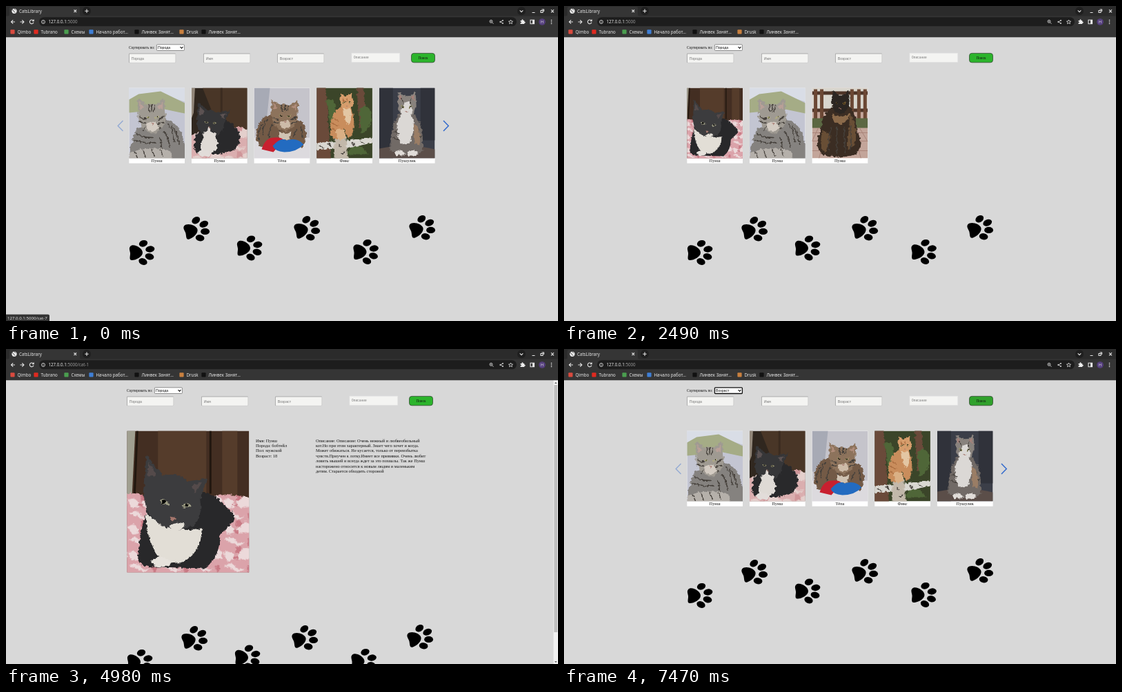
Write an HTML page that moves like this. It is 800 px wide and 456 px high and loops after 8 s.

```html
<!DOCTYPE html>
<html lang="ru">
<head>
<meta charset="utf-8">
<title>CatsLibrary</title>
<style>
  html, body { margin: 0; width: 100%; height: 100%; overflow: hidden; background: #d8d8d8; }
  svg { display: block; }
  #stage { width: 100vw; height: 100vh; }
  text { font: 6.2px 'Noto Sans', sans-serif; fill: #e8e8e8; white-space: pre; }
  .serif { font: 6.35px 'Liberation Serif', serif; fill: #111; }
  .sans { font: 5.2px 'Liberation Sans', sans-serif; fill: #111; }
  .mono { font: 4.5px 'Liberation Mono', monospace; }
  .hint { fill: #777; }
  .dim { fill: #999; }
  .mid { text-anchor: middle; }
  .line { fill: none; stroke: #e4e4e4; stroke-width: 1.1; }
  .fur { fill: none; stroke: #45403b; stroke-width: 1.5; stroke-linecap: round; }
  .soft { filter: url(#ruffle); }
</style>
</head>
<body>
<svg id="stage" viewBox="0 0 800 456" preserveAspectRatio="none">
  <defs>
    <filter id="ruffle" x="-5%" y="-5%" width="110%" height="110%" color-interpolation-filters="sRGB">
      <feTurbulence type="fractalNoise" baseFrequency=".22" numOctaves="2" seed="4"/>
      <feDisplacementMap in="SourceGraphic" scale="6" xChannelSelector="R" yChannelSelector="G"/>
      <feGaussianBlur stdDeviation=".45"/>
    </filter>
    <g id="paw">
      <path d="M2 9C7 5 19.500 12 19.500 18.500C19.500 24.500 10 29.500 4 29.500C-1 29.500 2 23 1.500 19C1 15-1 12 2 9Z"/>
      <ellipse rx="6.300" ry="4.700" transform="translate(20.500 5.300)rotate(-18)"/>
      <ellipse rx="6.600" ry="4.600" transform="translate(30.300 13.500)rotate(-8)"/>
      <ellipse rx="6.500" ry="4.600" transform="translate(29.500 24.300)rotate(14)"/>
      <ellipse rx="6.400" ry="4.600" transform="translate(20 31.500)rotate(24)"/>
    </g>
    <g id="face">
      <path d="M-9.500-.500Q-6.500-3-3.500 1.300-7.500 2.500-9.500-.500ZM9.500-.500Q6.500-3 3.500 1.300 7.500 2.500 9.500-.500Z" fill="currentColor"/>
      <circle cx="-6.500" r="1.100"/><circle cx="6.500" r="1.100"/>
      <path d="M-2 8h4L0 10.500Z" fill="#a5766c"/>
    </g>
    <pattern id="blanket" width="46" height="38" patternUnits="userSpaceOnUse">
      <path fill="#dba3aa" d="M0 0h46v38H0z"/>
      <path fill="#ecd9da" d="M3 6Q12-2 19 6T34 8Q27 17 18 12T3 6ZM26 22Q36 14 45 23T33 34 26 22ZM1 25Q10 18 16 27T7 36Z"/>
      <path fill="#c97a85" d="M20 17Q26 12 28 19T20 25ZM37 4Q44 3 42 12T36 9ZM15 31Q22 27 24 35Z"/>
    </pattern>

    <symbol id="tabby" viewBox="0 0 81 102" preserveAspectRatio="none">
      <path fill="#c3c5d2" d="M0 0h81v102H0z"/>
      <path fill="#d9dde6" d="M0 0h81v20L42 8 0 24z"/>
      <path fill="#a5ac86" d="M0 17L14 9 46 5 81 22V37L52 31 0 36z"/>
      <g class="soft">
        <path fill="#85827f" d="M12 58Q3 74 0 104H83V86Q75 48 52 45z"/>
        <path fill="#9f9a92" d="M13 42L13 15 26 25Q34 22 40 24L51 16 54 42Q51 62 35 67 19 63 13 42z"/>
        <path fill="#b9a098" d="M15 32V20l8 8zM49 32V21l-8 6z"/>
        <path class="fur" d="M28 25l2 9M33 24v10M38 25l-2 9M15 42l9 4M14 49l10 2M51 41l-8 5M50 50l-10 2M20 60l6-4M46 60l-5-4M56 52q9 10 10 25M62 55q9 12 11 28M51 63q7 9 8 23M10 67q10 5 25 5M7 75q14 6 30 4M44 72q4 8 3 16"/>
        <ellipse cx="34" cy="56" rx="9" ry="7" fill="#d3cbc2"/>
        <use href="#face" transform="translate(34 43)" color="#b9b577"/>
        <path fill="#b5b0aa" d="M0 94Q28 84 56 90 66 96 60 104H0z"/>
        <path class="fur" d="M8 92l4 9M20 90l4 10M33 89l4 10M46 90l3 8"/>
      </g>
    </symbol>

    <symbol id="tuxedo" viewBox="0 0 81 102" preserveAspectRatio="none">
      <path fill="#30271f" d="M0 0h81v102H0z"/>
      <path fill="#493627" d="M16 0h65v60H40z"/>
      <path fill="#92877a" d="M0 0h5l-2 36-3 8z"/>
      <path fill="#3b2b20" d="M42 0h3v45h-3z"/>
      <g class="soft">
        <path fill="#d9bfb7" d="M-3 70Q20 58 45 60 68 51 84 63v42H-3z"/>
        <path fill="url(#blanket)" opacity=".6" d="M-3 70Q20 58 45 60 68 51 84 63v42H-3z"/>
        <path fill="#29292b" d="M7 67Q0 86 8 95 40 100 62 90 76 76 65 58 55 46 42 46z"/>
        <path fill="#363638" d="M8 53L9 21 24 33Q32 31 37 36L56 33 47 53Q47 66 31 72 10 70 8 53z"/>
        <path fill="#5c5252" d="M12 40V28l7 7zM42 39l9-3-5 9z"/>
        <path fill="#dfdad5" d="M25 57l4 7q10 3 5 8 7 8 2 18-12 9-21 2-5-8 3-19-5-7 4-11z"/>
        <use href="#face" transform="translate(27 50)rotate(6)scale(.9)" color="#aaa67c"/>
        <path fill="#e2dcd9" d="M8 93q10-7 21 0 2 7-10 6-10 0-11-6z"/>
      </g>
    </symbol>

    <symbol id="rest" viewBox="0 0 81 102" preserveAspectRatio="none">
      <path fill="#c5c4cb" d="M0 0h81v102H0z"/>
      <path fill="#a7aab5" d="M0 0h23l-6 59H0z"/>
      <path fill="#dcdade" d="M0 72h81v30H0z"/>
      <g class="soft">
        <path fill="#735a46" d="M33 37Q5 39 3 67 0 84 19 88L70 86Q81 69 70 48z"/>
        <path fill="#8d735c" d="M25 40L25 17 38 25Q45 22 52 25L64 18 63 41Q61 58 45 63 28 59 25 40z"/>
        <path fill="#b08c7a" d="M28 31v-9l6 6zM61 31v-8l-7 5z"/>
        <path class="fur" d="M40 25l1 9M45 24v10M50 25l-1 9M27 43l9 3M29 50l7 1M62 43l-9 3M61 50l-8 1M20 45q-9 9-7 23M27 53q-7 9-5 20M12 53q-7 9-5 22M36 61l5 9M61 61l-4 10M68 58l2 14"/>
        <ellipse cx="45" cy="53" rx="8" ry="6" fill="#cdbba8"/>
        <use href="#face" transform="translate(45 41)scale(.9)" color="#aca76e"/>
        <path fill="#cfc2b2" d="M36 63q9 5 18 0l-2 13H38z"/>
      </g>
      <path fill="#c8202f" d="M11 89Q16 72 29 72 40 71 43 76L28 93z"/>
      <path fill="#236bc0" d="M27 84Q39 71 47 76 63 71 72 82 62 93 44 93 30 92 27 84z"/>
    </symbol>

    <symbol id="ginger" viewBox="0 0 81 102" preserveAspectRatio="none">
      <path fill="#3b4529" d="M0 0h81v102H0z"/>
      <g class="soft">
        <path fill="#6a4a3a" d="M-4-4h17l8 110H-4zM58-4h10l5 61H62z"/>
        <path fill="#4f6638" d="M14 19q10-8 13 8T20 55zM62 30q15-9 17 9T65 67zM48 87q15-9 28 9H43z"/>
        <path fill="#d9d7d1" d="M-4 80l38-3 50-5v7l-38 8-50 3z"/>
        <path fill="#c2b8aa" d="M27 66q8-4 15 2l4 38H25z"/>
        <path class="fur" d="M5 83l4 4M17 80l3 5M52 79l3 4M64 77l4 3M32 83l5 2M36 95l6-2"/>
        <path fill="#c98d5c" d="M34 27Q18 41 20 66 24 76 32 73L39 58 46 73 51 70Q58 49 50 26z"/>
        <path fill="#d69d6c" d="M34 22L35 8 42 12 51 8 54 22Q51 32 43 33 36 31 34 22z"/>
        <path fill="#e3c6a3" d="M39 29q7 2 10 0 4 13-2 26-8-9-8-26z"/>
        <path d="M24 44l9 5M22 51l10 4M21 59l9 3M38 15l2 5M44 14v6" stroke="#ac6f42" stroke-width="1.500"/>
        <use href="#face" transform="translate(44 21)scale(.62)" color="#a99f62"/>
        <path fill="#dab085" d="M28 61q8-5 13 3 3 9-4 12-10-1-9-15z"/>
      </g>
    </symbol>

    <symbol id="calico" viewBox="0 0 81 102" preserveAspectRatio="none">
      <path fill="#3b3e48" d="M0 0h81v102H0z"/>
      <path fill="#30323a" d="M0 0h20v102H0zM60 0h21v76H60z"/>
      <path fill="#5b4e49" d="M0 88q40-9 81 1v13H0z"/>
      <g class="soft">
        <path fill="#716a66" d="M29 37Q14 58 17 92 40 102 63 93 66 54 51 38z"/>
        <path fill="#88827d" d="M27 26L28 5 35 12Q40 9 45 12L53 6 54 27Q51 41 40 44 29 40 27 26z"/>
        <path fill="#a5817a" d="M30 18l-1-8 6 5zM51 18l1-8-6 4z"/>
        <path fill="#dbd8d5" d="M38 20h5l5 13q-3 6 2 13 2 16-6 34l-12 2q-10-18-4-36 5-7 3-13z"/>
        <path class="fur" d="M33 15l2 7M47 15l-2 7M21 63l7 4M20 72l8 3M58 60l-5 6M61 70l-6 4"/>
        <path fill="#9a7d65" d="M50 50q12 12 9 32-8 1-8-10z"/>
        <use href="#face" transform="translate(40 27)scale(.85)" color="#a5a06e"/>
        <path fill="#e0dcd8" d="M23 94q6-8 15 0l-1 4H25zM41 93q8-6 15 1l-2 4H42z"/>
      </g>
    </symbol>

    <symbol id="fluffy" viewBox="0 0 81 102" preserveAspectRatio="none">
      <path fill="#c3a59a" d="M0 0h81v102H0z"/>
      <path fill="#d8d5cd" d="M0 0h81v35H0z"/>
      <path fill="#4f3528" d="M0 5h81v5H0zM0 30h81v5H0z"/>
      <path d="M5 2v47M14 2v47M58 2v47M68 2v47M77 2v47" stroke="#6b4734" stroke-width="5"/>
      <path fill="#5b6742" d="M0 44h81v14H0z"/>
      <path d="M0 65h81M0 77h81M0 91h81M9 58L0 77M69 58l12 20M17 77l-7 25M64 77l7 25" stroke="#a98479"/>
      <g class="soft">
        <path fill="#3b2d23" d="M30 26Q14 38 12 64 2 84 14 96 40 104 64 96 76 81 65 62 65 35 52 25z"/>
        <path fill="#684e35" d="M16 61q-8 23 3 33l9-24zM55 38q13 20 7 44l-11 8z"/>
        <path fill="#2c2622" d="M29 24L30 3 38 10h8L54 4 54 24Q52 36 41 38 31 35 29 24z"/>
        <path fill="#8b6a4a" d="M29 37q13 9 25 0 2 10-13 16-14-4-12-16z"/>
        <path class="fur" d="M28 58q-6 16-3 33M36 58v37M46 58l2 36M55 55q4 18 0 34"/>
        <use href="#face" transform="translate(41 22)scale(.8)" color="#b0873f"/>
      </g>
    </symbol>

    <symbol id="portrait" viewBox="0 0 177 205" preserveAspectRatio="xMidYMid slice">
      <path fill="#432e22" d="M0 0h177v205H0z"/>
      <path fill="#a09f90" d="M0 0h12L7 100H0z"/>
      <path d="M15 0L11 92M121 0v91" stroke="#21170f" stroke-width="3"/>
      <path fill="#553c2b" d="M45 0h70v90H45zM138 0h22v96h-22z"/>
      <g class="soft">
        <path fill="url(#blanket)" d="M-5 91Q24 87 35 103L115 97Q144 88 182 98v112H-5z"/>
        <path fill="#28282a" d="M30 111Q17 150 16 185 17 198 42 197L113 199Q135 183 135 150L155 131Q159 119 147 114 127 87 104 88z"/>
        <path fill="#e2ded6" d="M27 118Q60 150 108 142 110 168 84 189 62 196 46 182 28 158 27 118z"/>
        <path fill="#3c3c3e" d="M25 83L28 34 52 65Q75 59 88 73L116 69 106 100Q111 127 94 138 62 151 36 126 22 105 25 83z"/>
        <path fill="#544a4a" d="M30 66l1-21 12 20zM93 80l16-6-10 16z"/>
        <path fill="#e2ded6" d="M62 138q8-9 20-4 4 7-8 10-9 2-12-6z"/>
        <use href="#face" transform="translate(70 105)rotate(9)scale(2.500)" color="#a3a288"/>
        <path fill="#e6e2dc" d="M35 188q13-10 28 0 2 9-13 9-15 0-15-9z"/>
      </g>
    </symbol>
  </defs>

  <rect width="800" height="456" fill="#d8d8d8"/>
  <g id="page"></g>

  <path fill="#2b2b2b" d="M0 0h800v15H0z"/>
  <path fill="#353535" d="M0 14.500h3q2 0 2-2V3q0-2 2-2h98q2 0 2 2v9.500q0 2 2 2H800v30.800H0z"/>
  <circle cx="12" cy="7.300" r="3.600" fill="#eee"/>
  <path d="M9 5.500l2 1 .5 2 2 .7M12 4l2 2" fill="none" stroke="#555" stroke-width=".9"/>
  <text x="19" y="9.600">CatsLibrary</text>
  <circle cx="117" cy="7.300" r="6" fill="#1f1f1f"/><circle cx="747" cy="7.300" r="6" fill="#1f1f1f"/>
  <path class="line" d="M98.500 5.500l3.600 3.600m0-3.600l-3.600 3.600M114.300 7.300h5.400M117 4.600V10M744.700 6.300l2.300 2.300 2.300-2.300M762.500 9.500h4M775 6.500h3v3h-3zM776.500 5h3v3M790 5.300l4 4m0-4l-4 4"/>
  <rect x="48" y="16.300" width="692" height="13" rx="6.500" fill="#1d1d1d"/>
  <path class="line" d="M13 23H7.500m2.700-2.700L7.500 23l2.700 2.700M20.500 23H26m-2.700-2.700L26 23l-2.700 2.700M39.700 21.300a2.900 2.900 0 1 0 .3 2.500M40.200 19.500v2.300h-2.300"/>
  <g class="line" style="stroke-width:.8">
    <circle cx="54" cy="23" r="2.500"/><path d="M54 22.700v1.700M54 21.300v.7"/>
    <circle cx="703" cy="22.300" r="2"/><path d="M704.500 23.800l2 2M702 22.300h2"/>
    <path d="M719.800 21l-3.300 2 3.300 2"/><circle cx="720" cy="21" r=".7"/><circle cx="716.300" cy="23" r=".7"/><circle cx="720" cy="25" r=".7"/>
    <path d="M731.500 20l.9 2 2.200.2-1.700 1.400.5 2.200-1.900-1.200-1.900 1.200.5-2.200-1.700-1.400 2.200-.2z"/>
  </g>
  <path fill="#eee" d="M745.500 21h2q-.5-1.700 1-1.700t1 1.700h1.700v1.800q1.500-.3 1.500 1t-1.500 1V26h-5.700v-1.700q1.500 0 1.500-.9t-1.500-.9z"/>
  <path class="line" d="M760 20.300h5.500v5.400H760z"/><path fill="#eee" d="M763 20h3v6h-3z"/>
  <circle cx="777" cy="23" r="4.800" fill="#56407f"/><text x="777" y="25" class="mid" style="font-size:5.500px">H</text>
  <g fill="#eee"><circle cx="790.500" cy="20.500" r=".8"/><circle cx="790.500" cy="23" r=".8"/><circle cx="790.500" cy="25.500" r=".8"/></g>
  <g id="bookmarks"></g>
  <text x="61.500" y="25.200">127.0.0.1<tspan class="dim" id="path"></tspan></text>
  <g id="status"><path id="statusBox" fill="#333"/><text x="2" y="453.500" id="statusText" style="font-size:6.100px"></text></g>
</svg>
<script>
const $ = id => document.getElementById(id);
const text = (x, y, s, cls = '', extra = '') => `<text x="${x}" y="${y}" class="${cls}" ${extra}>${s}</text>`;
const photo = (id, x, y, w, h) => `<use href="#${id}" x="${x}" y="${y}" width="${w}" height="${h}"/>`;

const bookmarks = [
  [6, 'Qimbo', '#d94a3f'], [40, 'Tubrano', '#e02a20'], [84, 'Схемы', '#4a9e4f'],
  [120, 'Начало работ…', '#3f7fd6'], [186, 'Линвек Занят…', '#111'],
  [251, 'Drusk', '#c9803f'], [283, 'Линвек Занят…', '#111']
];
$('bookmarks').innerHTML = bookmarks.map(([x, name, color]) =>
  `<rect x="${x + .4}" y="34.200" width="6.200" height="6.200" rx="1" fill="${color}"/>` + text(x + 10.500, 39.500, name)).join('');

const home = [['tabby', 'Пунш'], ['tuxedo', 'Пунш'], ['rest', 'Тёпа'], ['ginger', 'Фикс'], ['calico', 'Пушулик']];
const found = [['portrait', 'Пунш'], ['tabby', 'Пунш'], ['fluffy', 'Пунш']];
const facts = ['Имя: Пунш', 'Порода: бобтейл', 'Пол: мужской', 'Возраст: 18'];
const about = [
  'Описание: Описание: Очень нежный и любвеобильный',
  'кот.Но при этом характерный. Знает чего хочет и когда.',
  'Может обижаться. Не кусается, только от переизбытка',
  'чувств.Приучен к лотку.Имеет все прививки. Очень любит',
  'ловить мышей и всегда ждет за это похвалы. Так же Пунш',
  'насторожено относится к новым людям и маленьким',
  'детям. Старается обходить стороной'
];
const pawSpots = [[178.500, 338.500], [258, 305], [334.500, 332], [418, 304], [503, 337.500], [585, 303]];

function field(x, hint, value) {
  const border = value ? 'stroke="#111" stroke-width="1.500"' : 'stroke="#c2c2c2" stroke-width=".6"';
  return `<rect x="${x + .4}" y="68.800" width="67.400" height="13.500" rx="1.500" fill="#f4f4f2" ${border}/>` +
    (value ? text(x + 3.500, 77.500, value, 'sans') + `<path d="M${x + 17.500} 73v5.500" stroke="#111" stroke-width=".5"/>`
           : `<path d="M${x + .5} 82V69h67" fill="none" stroke="#999" stroke-width=".6"/>` + text(x + 3.700, 77.500, hint, 'sans hint'));
}

function form({ name, sort, green = '#30a12c' }) {
  return text(178, 62.200, 'Сортировать по:', 'serif', 'style="font-size:5.400px"') +
    `<rect x="218.400" y="55.800" width="40" height="8.700" rx="1" fill="#fff" stroke="${sort ? '#111' : '#666'}" stroke-width="${sort ? 1.3 : .7}"/>` +
    text(220, 62, sort || 'Порода', 'sans') +
    '<path d="M252.500 59.200l2 2 2-2" fill="none" stroke="#111" stroke-width="1.100"/>' +
    field(178, 'Порода') + field(286, 'Имя', name) + field(393, 'Возраст') +
    '<rect x="501" y="68.200" width="69.500" height="13" fill="#f4f4f2" stroke="#e6e6e6" stroke-width=".6"/>' +
    text(504, 75.800, 'Описание', 'mono hint') +
    `<rect x="587.500" y="68.400" width="34" height="13.400" rx="3.500" fill="${green}" stroke="#2a3a2a" stroke-width=".7"/>` +
    text(604.500, 76.800, 'Поиск', 'serif mid', 'style="font-size:5.200px"');
}

const cards = list => list.map(([id, name], i) => {
  const x = 178.300 + i * 90.650;
  return `<rect x="${x}" y="118.500" width="80.700" height="109.200" fill="#fff"/>` +
    photo(id, x, 118.500, 80.700, 102) + text(x + 40.300, 226.200, name, 'serif mid');
}).join('');

const arrows = '<g fill="none" stroke="#2c66cc" stroke-width="1.400">' +
  '<path d="M169.500 166l-7.300 7.500 7.300 7.500" opacity=".4"/><path d="M634 166l7.300 7.500-7.300 7.500"/></g>';

// Steps of the upper row are turned a little against those of the lower row.
const paws = dy => pawSpots.map(([x, y], i) =>
  `<use href="#paw" transform="translate(${x} ${y + dy})rotate(${i % 2 ? -14 : 0} 18.500 18.500)"/>`).join('');

const lines = (x, list) => list.map((s, i) => text(x, 134.500 + i * 7.400, s, 'serif')).join('');

const scrollbar = '<path fill="#f1f1f1" d="M793.500 45H800v411h-6.500z"/><path fill="#bebebe" d="M794.300 52h5v358h-5z"/>' +
  '<path fill="#555" d="M795 50l1.800-2 1.800 2zM795 452l1.800 2 1.800-2z"/>';

function pageMarkup(state) {
  if (state.view === 'cat')
    return `<g transform="translate(-3)">${form(state)}${paws(96)}</g>` +
      photo('portrait', 175.300, 118.500, 177, 205) + lines(362, facts) + lines(449, about) + scrollbar;
  return form(state) + (state.view === 'found' ? cards(found) : cards(home) + arrows) + paws(0);
}

const bright = '#2cb42c';
const timeline = [
  { at: 0, view: 'home', status: 'cat-7', green: bright },
  { at: 1660, view: 'home', status: 'cat-7', fade: .6, name: 'Пунш' },
  { at: 2490, view: 'found', green: bright },
  { at: 3320, view: 'found', status: 'cat-1', green: bright },
  { at: 4150, view: 'cat', green: bright },
  { at: 5810, view: 'home', status: 'cat-10' },
  { at: 6640, view: 'home' },
  { at: 7470, view: 'home', sort: 'Возраст' }
];

function show(state) {
  $('page').innerHTML = pageMarkup(state);
  $('path').textContent = ':5000' + (state.view === 'cat' ? '/cat-1' : '');
  $('status').setAttribute('opacity', state.status ? state.fade || 1 : 0);
  if (!state.status) return;
  const width = state.status.length > 5 ? 67 : 63;
  $('statusBox').setAttribute('d', `M0 446.500h${width - 2}q2 0 2 2V456H0z`);
  $('statusText').textContent = '127.0.0.1:5000/' + state.status;
}

let current;
function tick() {
  const time = performance.now() % 8000;
  const state = timeline.findLast(s => s.at <= time);
  if (state !== current) show(current = state);
  requestAnimationFrame(tick);
}
tick();
</script>
</body>
</html>
```
